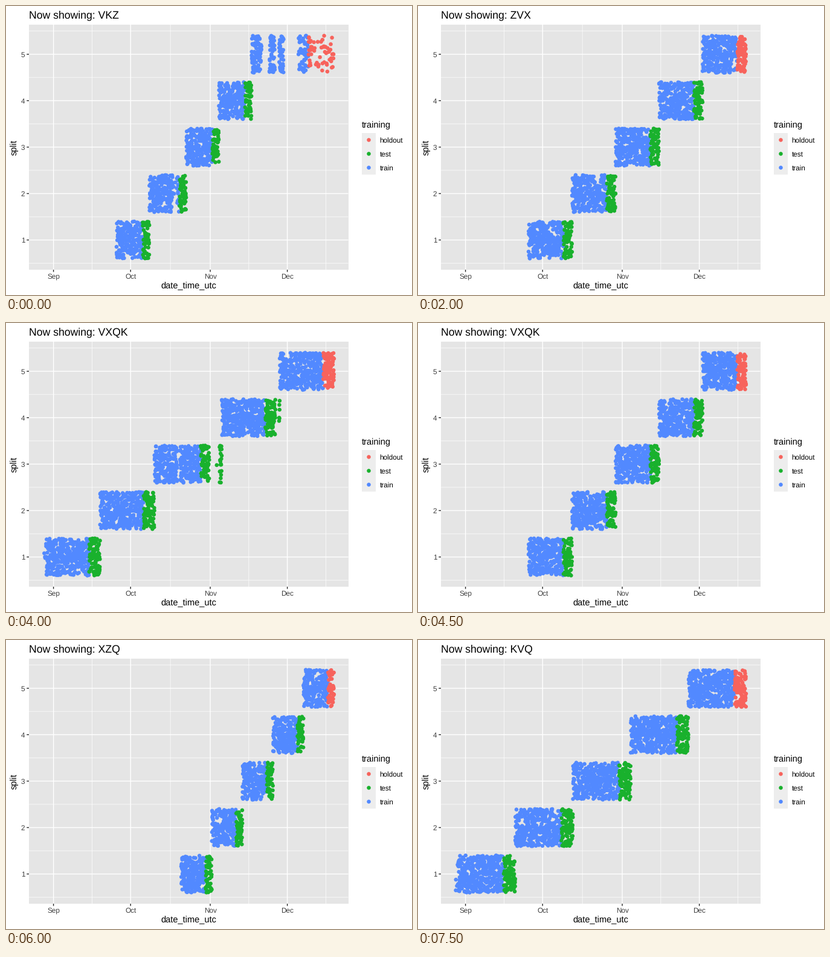
Animation, 672 px wide and 480 px high, one loop 8 s. Source, as a matplotlib script:

```python
import numpy as np
import matplotlib.pyplot as plt
from matplotlib.animation import FuncAnimation
from matplotlib.colors import to_rgba
from matplotlib.patches import Rectangle

W, H, DPI = 672, 480, 96
PX = 72 / DPI  # points per pixel
LEFT, RIGHT, TOP, BOTTOM = 38, 566.5, 31, 438
DAY = 4.253    # pixels per day
ROW = 77.1     # pixels between two splits
LAST = 543     # x of the newest sample
HOURLY = 5.3   # samples per pixel of time
DOT = (6.5 * PX) ** 2
TRAIN, TEST, HOLDOUT = "#5289FF", "#19B12D", "#F7635C"
PALETTE = np.array([to_rgba(c) for c in (TRAIN, TEST, HOLDOUT)])

plt.rcParams["font.family"] = "Liberation Sans"
plt.rcParams["text.hinting"] = "none"

fig = plt.figure(figsize=(W / DPI, H / DPI), dpi=DPI, facecolor="white")
ax = fig.add_axes([0, 0, 1, 1])
ax.set_xlim(0, W)
ax.set_ylim(H, 0)
ax.axis("off")


def row_y(split):
    return 388.6 - ROW * (split - 1)


def line(xs, ys, color, width, z=1):
    ax.plot(xs, ys, color=color, lw=width * PX, solid_capstyle="butt",
            snap=False, zorder=z)


def label(x, y, text, size=11, color="black", **kw):
    return ax.text(x, y, text, fontsize=size, color=color, **kw)


def box(x, y, w, h, color):
    ax.add_patch(Rectangle((x, y), w, h, facecolor=color, lw=0, zorder=0))


# panel, grid and axes
months = 78.6 + DAY * np.array([0, 30, 61, 91])
box(LEFT, TOP, RIGHT - LEFT, BOTTOM - TOP, "#E5E5E5")
for x in months + np.diff(months, append=months[-1] + 30 * DAY) / 2:
    line([x, x], [TOP, BOTTOM], "white", 0.71)
for k in range(6):
    line([LEFT, RIGHT], [row_y(k + 0.5)] * 2, "white", 0.71)
for x, month in zip(months, ("Sep", "Oct", "Nov", "Dec")):
    line([x, x], [TOP, BOTTOM], "white", 1.42, 2)
    line([x, x], [BOTTOM, BOTTOM + 3.7], "#2B2B2B", 1.42)
    label(x, 453, month, 8.8, "#404040", ha="center")
for k in range(1, 6):
    y = row_y(k)
    line([LEFT, RIGHT], [y, y], "white", 1.42, 2)
    line([LEFT - 3.7, LEFT], [y, y], "#2B2B2B", 1.42)
    label(31.3, y + 4.2, str(k), 8.8, "#404040", ha="right")
label(302, 469.5, "date_time_utc", ha="center")
label(13.6, 234.5, "split", rotation=90, ha="center", va="center")
title = label(37.8, 20, "", 13.2)

# legend
label(588.3, 202, "training")
for k, (name, color) in enumerate(zip(("holdout", "test", "train"), (HOLDOUT, TEST, TRAIN))):
    y = 222 + 23 * k
    box(588.5, y - 11.5, 23, 23, "#EDEDED")
    ax.scatter([600], [y], s=DOT, c=color, lw=0, zorder=3)
    label(618.5, y + 4.4, name, 8.8)


# first sample of each data set, and spans with few or no samples (from, to, share kept)
STARTS = [183, 62, 183, 66, 62, 183, 290, 183, 62]
SPARSE = {
    0: [(276, 284, 0.1), (423, 436, 0), (445, 452, 0), (459.5, 484, 0),
        (484, 506, 0.65), (506, 522, 0.1), (522, LAST, 0.3)],
    3: [(183.5, 472, 0)],
    4: [(283.5, 288, 0), (336.5, 353.5, 0.05), (446, 452, 0)],
}


def cloud(k):
    """Jittered hourly samples of one data set: positions and colours."""
    rng = np.random.default_rng(k + 20)
    x = np.arange(STARTS[k], LAST, 1 / HOURLY)
    for a, b, share in [(0, 66, 0.1)] + SPARSE.get(k, []):
        x = x[(x < a) | (x >= b) | (rng.random(len(x)) < share)]

    # five splits of equal count, the last fifth of each kept for testing
    place = 5 * np.arange(len(x)) / len(x)
    split = place.astype(int) + 1
    late = place % 1 >= 0.8
    kind = np.where(late, np.where(split == 5, 2, 1), 0)

    jitter = rng.uniform(-0.4, 0.4, len(x))
    jitter[rng.random(len(x)) < 0.05] = 0
    return np.column_stack([x, row_y(split + jitter)]), PALETTE[kind]


CLOUDS = [cloud(k) for k in range(len(STARTS))]
NAMES = ["VKZ", "XQV", "ZVX", "KZXV", "VXQK", "QKVZ", "XZQ", "KVQ"]
dots = ax.scatter([], [], s=DOT, lw=0, zorder=3)


def update(i):
    # the data switches half a step ahead of the title
    points, colors = CLOUDS[(i + 1) // 2]
    dots.set_offsets(points)
    dots.set_facecolor(colors)
    title.set_text("Now showing: " + NAMES[i // 2])
    return dots, title


anim = FuncAnimation(fig, update, frames=16, interval=500, repeat=True, repeat_delay=0)
plt.show()
```
